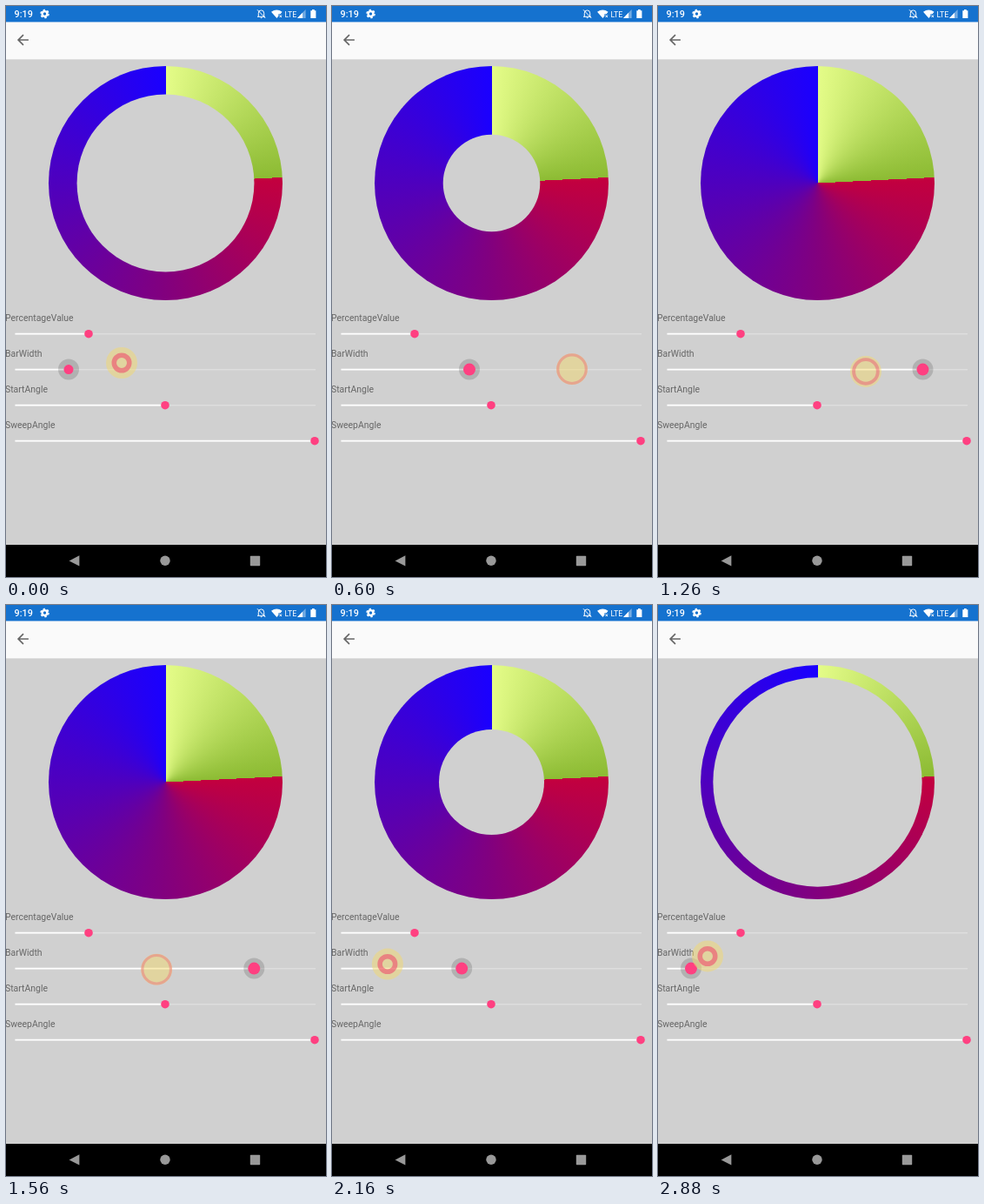
Write an HTML page that moves like this. It is 368 by 656 pixels and loops after 2.94 s.

```html
<!DOCTYPE html>
<html lang="en">
<head>
<meta charset="utf-8">
<title>Ring chart sliders</title>
<style>
html, body { margin: 0; width: 100%; height: 100%; overflow: hidden; background: #d0d0d0; }
#ring {
  position: absolute; left: 49px; top: 69px; width: 269px; height: 269px; border-radius: 50%;
  background: conic-gradient(from .2deg,
    #e4fc88, #8cbb33 87deg, #c3003e 87deg, #82007e 180deg, #1a00ff);
}
svg { position: absolute; left: 0; top: 0; display: block; }
text { font-family: Roboto, Arial, sans-serif; }
</style>
</head>
<body>
<div id="ring"></div>
<svg width="368" height="656" viewBox="0 0 368 656">
  <circle id="hole" cx="183.5" cy="203.5" fill="#d0d0d0"/>

  <!-- app bar -->
  <rect y="18" width="368" height="43.3" fill="#fafafa"/>
  <path transform="translate(9.7 29.3) scale(.81)" fill="#666"
    d="M20 11H7.83l5.59-5.59L12 4l-8 8 8 8 1.41-1.41L7.83 13H20z"/>

  <!-- status bar -->
  <rect width="368" height="18.4" fill="#1572cf"/>
  <g fill="#fff">
    <text x="9.5" y="13" font-size="10.8" font-weight="500">9:19</text>
    <circle cx="44.5" cy="9" r="2.9" fill="none" stroke="#fff" stroke-width="2.4"/>
    <circle cx="44.5" cy="9" r="4.6" fill="none" stroke="#fff" stroke-width="1.4" stroke-dasharray="2.4 2.417"/>
    <path d="M290.3 12V8.3a3.2 3.4 0 0 1 6.4 0V12M289 12.3h9M289 4.3l9.2 9.6" fill="none" stroke="#fff"/>
    <path d="M292.6 13.2h2a1 1 0 0 1-2 0z"/>
    <path d="M305 6.7q6.3-4.6 12.6 0l-2 2.6h-2.2v2.3l-2 2.3z"/>
    <path d="M314.5 10.3l2.5 2.7m0-2.7l-2.5 2.7" stroke="#fff"/>
    <text x="320.4" y="12.6" font-size="8.8">LTE</text>
    <path d="M335 14l9.6-10V14z" opacity=".4"/>
    <path d="M335 14l6-6.2V14z"/>
    <path d="M350.3 5.2h1.7V4h2.7v1.2h1.7V14h-6.1z"/>
  </g>

  <g id="sliders"></g>
  <circle id="halo" cy="417.6" r="12" fill="#000" opacity=".15"/>
  <circle id="thumb" cy="417.6" fill="#ff4081"/>

  <!-- navigation bar -->
  <rect y="619" width="368" height="37"/>
  <g fill="#999">
    <path d="M72.6 637.4l11.8-6.2v12.4z"/>
    <circle cx="183" cy="637.3" r="5.7"/>
    <rect x="280.8" y="631.8" width="11.4" height="11.4" rx=".7"/>
  </g>

  <g id="touch">
    <circle r="18" fill="#f4da70" opacity=".5"/>
    <circle id="ripple" fill="none" stroke="#ee5070"/>
  </g>
</svg>
<script>
const LOOP = 2940, STEP = 60, LAG = 480, LEFT = 10.5, RIGHT = 355;
const $ = id => document.getElementById(id);
const set = (el, attrs) => { for (const k in attrs) el.setAttribute(k, attrs[k]); };

// [time, x] key points of the finger: one sweep right, one back left
const touchX = [[-480, 72], [-240, 92], [120, 158], [600, 276], [940, 308],
  [1380, 210], [1980, 94], [2400, 38], [2880, 57]];
const touchY = t => 410 + 10 * Math.sin(Math.PI * t / 2350);

// smooth curve through the key points of a path
function at(path, t) {
  const last = path.length - 1;
  let i = 0;
  while (i < last - 1 && t >= path[i + 1][0]) i++;
  const slope = k => {
    const a = path[Math.max(k - 1, 0)], b = path[Math.min(k + 1, last)];
    return (b[1] - a[1]) / (b[0] - a[0]);
  };
  const [t0, v0] = path[i], [t1, v1] = path[i + 1], d = t1 - t0, u = (t - t0) / d, w = 1 - u;
  return v0 * w * w * (1 + 2 * u) + v1 * u * u * (3 - 2 * u)
    + d * u * w * (slope(i) * w - slope(i + 1) * u);
}

const sliders = [["PercentageValue", 95], ["BarWidth", 0], ["StartAngle", 183], ["SweepAngle", RIGHT]];
$("sliders").innerHTML = sliders.map(([name, x], i) => {
  const y = 376.7 + i * 41;
  return `<text x="-1" y="${y - 14.8}" font-size="10.45" fill="#666">${name}</text>
    <path d="M${LEFT} ${y}H${RIGHT + 1}" stroke="#dedede" stroke-width="1.6"/>
    <path class="fill" d="M${LEFT} ${y}H${x}" stroke="#fff" stroke-width="1.8"/>
    ${x ? `<circle cx="${x}" cy="${y}" r="4.8" fill="#ff4081"/>` : ""}`;
}).join("");
const barFill = document.querySelectorAll(".fill")[1];

function draw(now) {
  const t = Math.floor(now % LOOP / STEP) * STEP;

  // the slider trails the finger
  const x = at(touchX, t - LAG);
  const width = .5365 * (x - 10) - .7;
  set($("hole"), { r: Math.max(0, 134.5 - width) });
  set(barFill, { d: `M${LEFT} 417.7H${x}` });
  set($("thumb"), { cx: x, r: Math.min(7, 5.5 + t / 80) });
  set($("halo"), { cx: x });

  // rings spread from the finger, slowing and fading, four steps each
  const phase = (.4 + t / (4 * STEP)) % 1, spread = 1 - (1 - phase) ** 2;
  const outer = 18 * spread, inner = Math.max(0, 1.38 * outer - 9.9);
  set($("touch"), { transform: `translate(${at(touchX, t)} ${touchY(t)})` });
  set($("ripple"), {
    r: (outer + inner) / 2,
    "stroke-width": outer - inner,
    opacity: Math.min(.8, 1.1 - .75 * spread)
  });
}

const start = performance.now();
function tick() {
  draw(performance.now() - start);
  requestAnimationFrame(tick);
}
tick();
</script>
</body>
</html>
```
